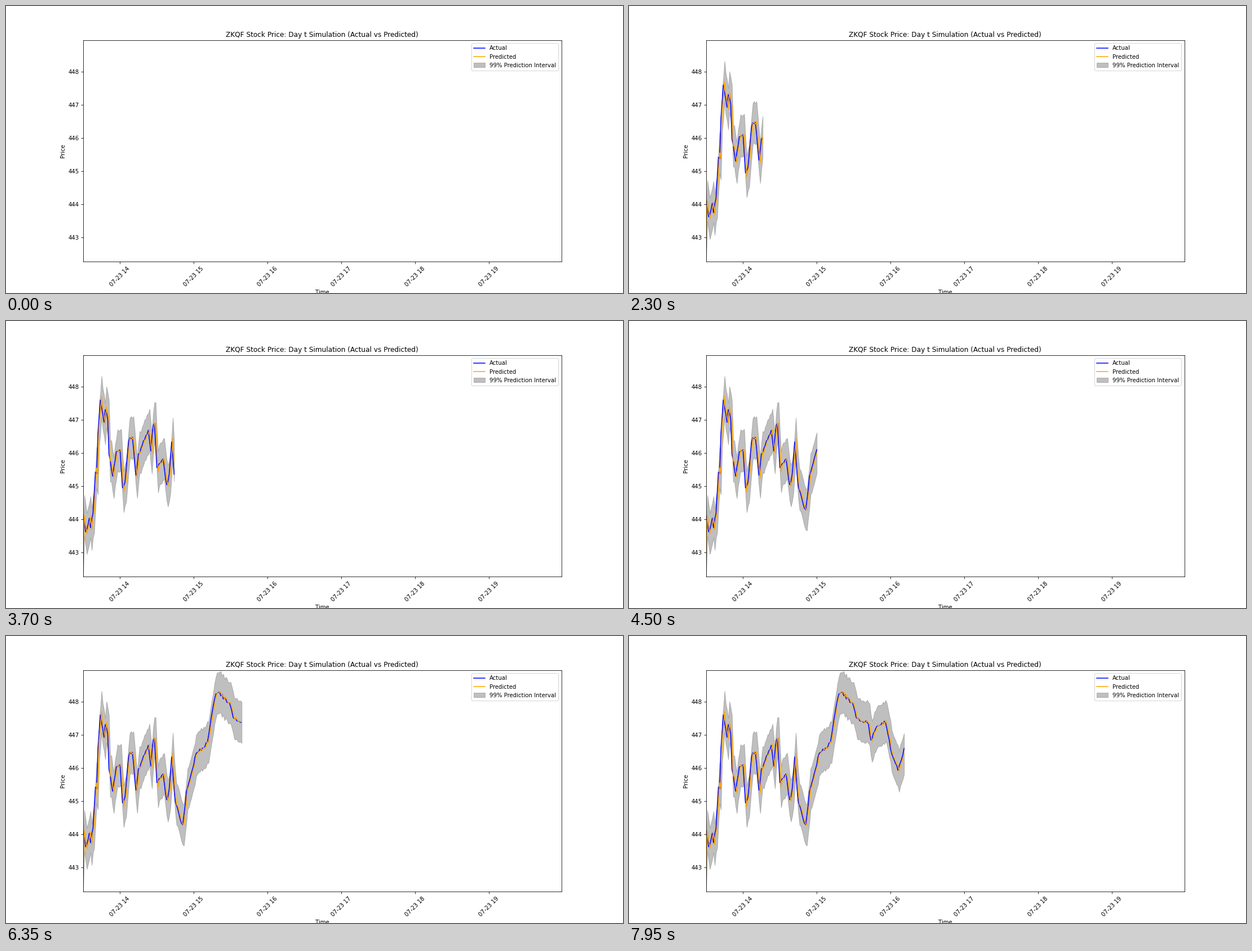
Animation of 1095 by 511 pixels, one loop 8 s. Source, as a matplotlib script:

```python
import numpy as np
import matplotlib.pyplot as plt
from matplotlib.animation import FuncAnimation

FRAMES = 160
NO_TRADES = [93, 105]     # minutes without a quote
HALF_WIDTH = 0.62         # half of the prediction interval
OVERSHOOT = 0.2           # share of the last move the forecast carries on
WIGGLE = 0.05

# Turning points of the price: minute after the opening, price above 440
TURNS = [
    (0, 4.1), (2, 3.6), (5, 4.0), (6, 3.8), (8, 4.15), (10, 5.45), (11, 5.4),
    (12, 6.6), (14, 7.6), (17, 6.9), (18, 7.3), (20, 7.05), (21, 6.0),
    (24, 5.35), (27, 6.0), (30, 6.1), (32, 5.0), (34, 5.1), (37, 6.4),
    (40, 6.5), (43, 5.3), (45, 5.95), (53, 6.7), (55, 6.1), (57, 6.85),
    (58, 6.85), (60, 5.55), (65, 5.85), (68, 5.0), (70, 5.35), (72, 6.3),
    (75, 4.95), (81, 4.25), (84, 5.25), (92, 6.45), (101, 6.75), (106, 7.9),
    (108, 8.25), (111, 8.25), (120, 7.9), (122, 7.5), (132, 7.35), (134, 6.8),
    (138, 7.2), (146, 7.4), (151, 6.4), (156, 5.95), (161, 6.55),
]


def build_series():
    minute = np.arange(FRAMES + len(NO_TRADES))
    noise = np.random.default_rng(7).uniform(-WIGGLE, WIGGLE, minute.size)
    actual = 440 + np.interp(minute, *zip(*TURNS)) + noise
    # The forecast follows the last quote and overshoots its last move
    last_move = np.diff(actual, prepend=actual[0])
    predicted = np.roll(actual + OVERSHOOT * last_move, 1)
    predicted[0] = actual[0] - 1.2
    return np.delete([minute, actual, predicted], NO_TRADES, axis=1)


minute, actual, predicted = build_series()
lower, upper = predicted - HALF_WIDTH, predicted + HALF_WIDTH

fig, ax = plt.subplots(figsize=(15, 7), dpi=73)
ax.set_xlim(0, 389)
ax.set_ylim(442.282, 448.944)
ax.set_xticks([30 + 60 * k for k in range(6)],
              [f"07-23 {14 + k}" for k in range(6)], rotation=45)
ax.set_yticks(range(443, 449))
ax.set_title("ZKQF Stock Price: Day t Simulation (Actual vs Predicted)")
ax.set_xlabel("Time")
ax.set_ylabel("Price")

actual_line, = ax.plot([], [], color="blue", label="Actual")
predicted_line, = ax.plot([], [], color="orange", label="Predicted")
band = ax.fill_between(minute, lower, upper, color="gray", alpha=0.5,
                       label="99% Prediction Interval")
ax.legend(loc="upper right")


def update(frame):
    n = frame + 1
    x = minute[:n]
    actual_line.set_data(x, actual[:n])
    predicted_line.set_data(x, predicted[:n])
    outline = np.column_stack([np.r_[x, x[::-1]],
                               np.r_[lower[:n], upper[:n][::-1]]])
    band.set_verts([outline] if frame else [])
    return actual_line, predicted_line, band


anim = FuncAnimation(fig, update, frames=FRAMES, interval=50,
                     init_func=lambda: update(0), repeat=True, repeat_delay=0)
plt.show()
```
